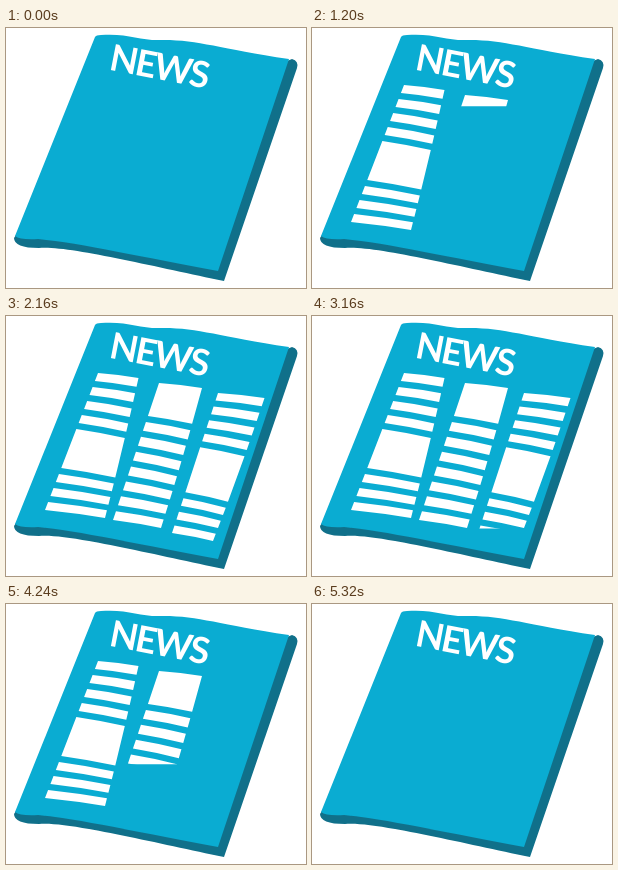
An HTML page for the animation above (5920 ms loop, 300x260 px).

```html
<!DOCTYPE html>
<html lang="en">
<head>
<meta charset="utf-8">
<title>News</title>
<style>
html, body { margin: 0; width: 100%; height: 100%; overflow: hidden; background: #fff; }
svg { display: block; width: 300px; height: 260px; }
text { font: 700 36.5px Lato, sans-serif; letter-spacing: -2.1px; fill: #fff; }
</style>
</head>
<body>
<svg id="stage" viewBox="0 0 300 260">
  <path fill="#10708a" d="M281 33L286 31Q293 33 291 40L218 253C150 239 60 217 33 220Q8 220 8 210L12 204Z"/>
  <path fill="#0aacd2" d="M89 9Q90 7 95 7C120 5 133 12 152 12C190 11 210 20 283 31L212 243C140 230 75 215 32 211Q14 212 9 208Z"/>
  <text transform="translate(102 41.5) rotate(11)">NEWS</text>
</svg>
<script>
const LOOP = 5920, STEP = 40, ROWS = 8, GAP = 6;

// left/right: x of each side at the top and bottom; y, height: extent of the left side
// photo: index and height of the tall row; show/hide: start, end and ease of the wipe
const columns = [
  { left: [92, 39], right: [132.5, 99], y: 57, height: 137, photo: [4, 39],
    show: [40, 1120, .45], hide: [4640, 5320, .53] },
  { left: [153, 107], right: [196, 155], y: 67, height: 137, photo: [0, 33],
    show: [1160, 1560, -.25], hide: [4040, 4600, 0] },
  { left: [212, 166], right: [258.5, 207], y: 77, height: 140, photo: [4, 45],
    show: [1716, 2160, 0], hide: [3120, 3760, .37] }
];

function add(parent, tag, attrs) {
  const el = document.createElementNS("http://www.w3.org/2000/svg", tag);
  for (const key in attrs) el.setAttribute(key, attrs[key]);
  return parent.appendChild(el);
}

const mix = ([a, b], u) => a + (b - a) * u;

// How far a line falls from left to right: steepest on the page's bulge
const drop = u => 5 + 3 * u + 3 * Math.sin(Math.PI * u);

// End points and arched middle of a line at height u (0 to 1) in a column
function edge({ left, right, y, height }, u) {
  const x1 = mix(left, u), x2 = mix(right, u), y1 = y + height * u, y2 = y1 + drop(u);
  return { start: `${x1} ${y1}`, end: `${x2} ${y2}`, mid: `${(x1 + x2) / 2} ${(y1 + y2) / 2 - 1}` };
}

function columnPath(col) {
  const [photoRow, photoHeight] = col.photo;
  const stripe = (col.height - photoHeight) / (ROWS - 1) - GAP;
  let path = "", pos = 0;
  for (let i = 0; i < ROWS; i++) {
    const size = i === photoRow ? photoHeight : stripe;
    const a = edge(col, pos / col.height), b = edge(col, (pos + size) / col.height);
    path += `M${a.start}Q${a.mid} ${a.end}L${b.end}Q${b.mid} ${b.start}Z`;
    pos += size + GAP;
  }
  return path;
}

const stage = document.getElementById("stage");
columns.forEach((col, i) => {
  const clip = add(stage, "clipPath", { id: "wipe" + i });
  col.wipe = add(clip, "rect", { x: 0, y: col.y, width: 300, height: 0 });
  add(stage, "path", { fill: "#fff", "clip-path": `url(#wipe${i})`, d: columnPath(col) });
});

function progress(t, [start, end, ease]) {
  const p = Math.min(1, Math.max(0, (t - start) / (end - start)));
  return p + ease * p * (1 - p);
}

function draw(now) {
  const t = Math.floor(now % LOOP / STEP) * STEP;
  for (const { wipe, height, show, hide } of columns) {
    const shown = progress(t, show) - progress(t, hide);
    wipe.setAttribute("height", Math.max(0, shown) * (height + drop(1)));
  }
  requestAnimationFrame(() => draw(performance.now()));
}
draw(0);
</script>
</body>
</html>
```
